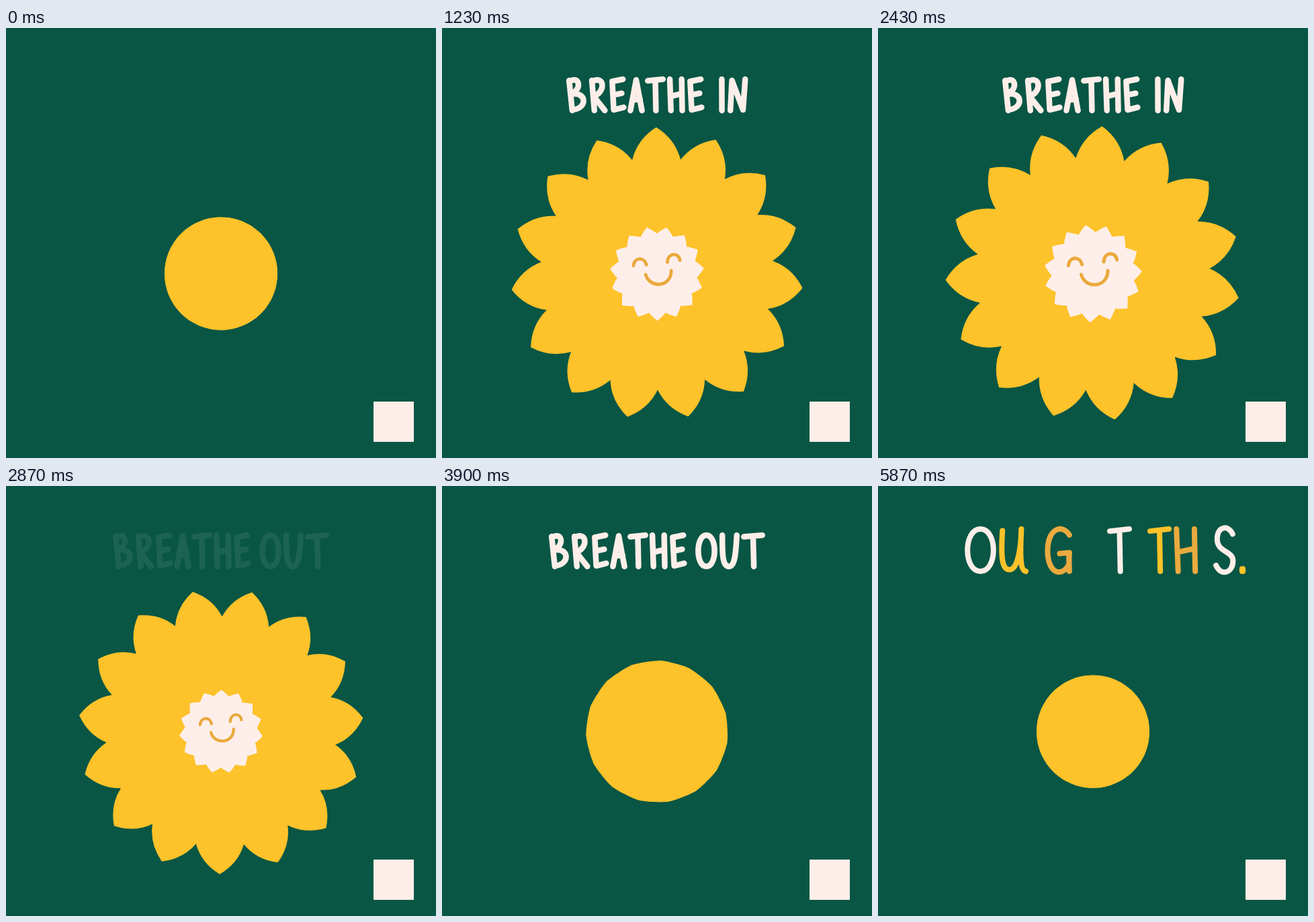
Recreate the animation shown at these times as an HTML page. Size 640 by 640 pixels, loop 6160 ms.

```html
<!DOCTYPE html>
<html lang="en">
<head>
<meta charset="utf-8">
<title>Breathing flower</title>
<style>
  html, body { margin: 0; width: 100%; height: 100%; overflow: hidden; background: #095644; }
  svg { display: block; width: 100vw; height: 100vh; }
  .words path { fill: none; stroke-linecap: round; stroke-linejoin: round; vector-effect: non-scaling-stroke; }
  .face { fill: none; stroke: #eaa93c; stroke-width: 5; stroke-linecap: round; }
</style>
</head>
<body>
<svg viewBox="0 0 640 640">
  <rect width="640" height="640" fill="#095644"/>
  <g transform="translate(320 365.5)">
    <g fill="#fec22a">
      <circle r="84"/>
      <path id="petals"/>
    </g>
    <g id="heart">
      <path id="disc" fill="#fdeee9"/>
      <path class="face" d="M-36.5-12C-35-26-19-26-16.500-13.500M16-17.500C17-33 34-33 35.500-20.500M-17.500 1.500C-12 23 22 22 22-4.500"/>
    </g>
  </g>
  <g id="inhale" class="words" role="img" aria-label="BREATHE IN"></g>
  <g id="exhale" class="words" role="img" aria-label="BREATHE OUT"></g>
  <g id="cheer" class="words" role="img" aria-label="YOU GOT THIS."></g>
  <rect x="547" y="556" width="60" height="60" fill="#fdeee9"/>
</svg>
<script>
const LOOP = 6160;
const CREAM = '#fdeee9', YELLOW = '#fec22a', ORANGE = '#eaaa3f';
const $ = id => document.getElementById(id);

// Brush strokes of each letter inside a 100 x 100 box
const GLYPHS = {
  A: 'M6 100L50 2L94 100M22 66L80 64',
  B: 'M4 4L24 100M4 8C66-14 92 30 18 48C116 38 124 94 24 98',
  E: 'M92 0L6 7L18 98L98 90M12 51L82 45',
  G: 'M94 14C62-14 4 0 4 52S62 116 92 84L94 56L54 58M92 60L94 100',
  H: 'M4 0L12 100M90 0L94 100M8 55L92 46',
  I: 'M46 0L54 100',
  N: 'M4 100L14 4L84 98L98 0',
  O: 'M50 0C-16 0-16 100 50 100S116 0 50 0',
  R: 'M4 4L22 100M4 8C96-16 108 42 16 54L98 100',
  S: 'M92 12C72-10 10-8 10 24S94 50 94 76S34 114 4 86',
  T: 'M0 5L100 0M50 4L54 100',
  U: 'M4 0C4 60 4 100 46 100S90 46 96 0',
  u: 'M6 4C0 62 2 96 34 96S80 50 82 0C76 66 78 98 100 100',
  Y: 'M2 0L48 48M98 0C78 36 58 60 44 100',
  '.': 'M30 94H70V100H30Z'
};

// Each entry: letter, left edge, width
function letter(parent, weight, top, bottom, [glyph, left, width]) {
  const path = document.createElementNS('http://www.w3.org/2000/svg', 'path');
  const sx = (width - weight) / 100, sy = (bottom - top - weight) / 100;
  path.setAttribute('d', GLYPHS[glyph]);
  path.setAttribute('transform',
    `translate(${left + weight / 2} ${top + weight / 2}) scale(${sx} ${sy})`);
  path.style.strokeWidth = weight;
  path.style.stroke = CREAM;
  parent.append(path);
  return path;
}

const BREATHE = [['B', 0, 32], ['R', 34, 29], ['E', 64, 27], ['A', 91, 28],
                 ['T', 118, 31], ['H', 150, 29], ['E', 180, 27]];
const shift = (letters, dx) => letters.map(([glyph, x, w]) => [glyph, x + dx, w]);

for (const entry of [...shift(BREATHE, 184), ['I', 411, 11], ['N', 424, 32]])
  letter($('inhale'), 8.5, 72, 127, entry);
for (const entry of [...shift(BREATHE, 158), ['O', 377, 33], ['U', 412, 32], ['T', 445, 36]])
  letter($('exhale'), 8.5, 69, 124, entry);
const cheerLetters = [
  ['Y', 92, 36], ['O', 129, 47], ['u', 179, 45], ['G', 247, 44], ['O', 300, 39],
  ['T', 341, 37], ['T', 401, 36], ['H', 439, 39], ['I', 482, 11], ['S', 498, 36], ['.', 537, 11]
].map(entry => letter($('cheer'), 8, 60, 131, entry));

const clamp = x => Math.min(1, Math.max(0, x));
const ramp = (t, from, to) => clamp((t - from) / (to - from));

// Smooth curve through [time, value] points, flat at turning points
function curve(points) {
  const rise = i => (points[i + 1][1] - points[i][1]) / (points[i + 1][0] - points[i][0]);
  const slopes = points.map((_, i) => {
    if (i === 0) return rise(0);
    if (i === points.length - 1) return 0;
    const a = rise(i - 1), b = rise(i);
    return a * b <= 0 ? 0 : 2 * a * b / (a + b);
  });
  return t => {
    if (t >= points.at(-1)[0]) return points.at(-1)[1];
    const i = points.findIndex(p => p[0] > t) - 1;
    const [t0, a] = points[i], [t1, b] = points[i + 1];
    const h = t1 - t0, u = (t - t0) / h, v = 1 - u;
    return a * (1 + 2 * u) * v * v + b * (3 - 2 * u) * u * u
      + h * u * v * (slopes[i] * v - slopes[i + 1] * u);
  };
}

const reach = curve([[0, 84], [200, 105], [630, 161.5], [770, 181], [1000, 206], [1270, 218.5],
  [1400, 219.7], [2650, 219.7], [3170, 191], [3300, 178.5], [3800, 115], [3900, 106],
  [4200, 87], [4430, 84]]);
const turn = curve([[0, -3], [770, 12.9], [1670, 34.2], [2430, 51.5], [3300, 68],
  [3900, 75], [4430, 78]]);

const polar = (r, deg) => {
  const a = deg * Math.PI / 180;
  return `${(r * Math.sin(a)).toFixed(2)} ${(-r * Math.cos(a)).toFixed(2)}`;
};

// Closed ring of 15 points with curved flanks
function ring(tip, valley, angle, bulge) {
  const bend = valley + (tip - valley) * bulge;
  let d = 'M' + polar(valley, angle - 12);
  for (let i = 0; i < 15; i++) {
    const a = angle + i * 24;
    d += `Q${polar(bend, a - 8)} ${polar(tip, a)}Q${polar(bend, a + 8)} ${polar(valley, a + 12)}`;
  }
  return d + 'Z';
}

function draw(t) {
  const tip = reach(t), angle = turn(t);
  $('petals').setAttribute('d', ring(tip, tip - 0.0025 * (tip - 84) ** 2, angle, 0.65));

  const open = clamp((tip - 170.5) / 49);
  $('heart').setAttribute('transform', `scale(${open})`);
  $('heart').style.display = open > 0 ? '' : 'none';
  $('disc').setAttribute('d', ring(73, 70 - 8.5 * open, angle + 12, 0.38));

  $('inhale').style.opacity = ramp(t, 0, 300) * (1 - ramp(t, 2650, 2850));
  $('exhale').style.opacity = ramp(t, 2850, 3100) * (1 - ramp(t, 4050, 4300));

  // Four-step colour chase, one letter further every 300 ms
  const beat = Math.floor((t - 4370) / 300);
  $('cheer').style.display = beat < 0 ? 'none' : '';
  const colours = ['none', CREAM, YELLOW, ORANGE];
  cheerLetters.forEach((path, i) => {
    path.style.stroke = colours[(i + 9 - Math.min(5, Math.max(0, beat))) % 4];
  });
}

const start = performance.now();
function tick() {
  draw((performance.now() - start) % LOOP);
  requestAnimationFrame(tick);
}
tick();
</script>
</body>
</html>
```
